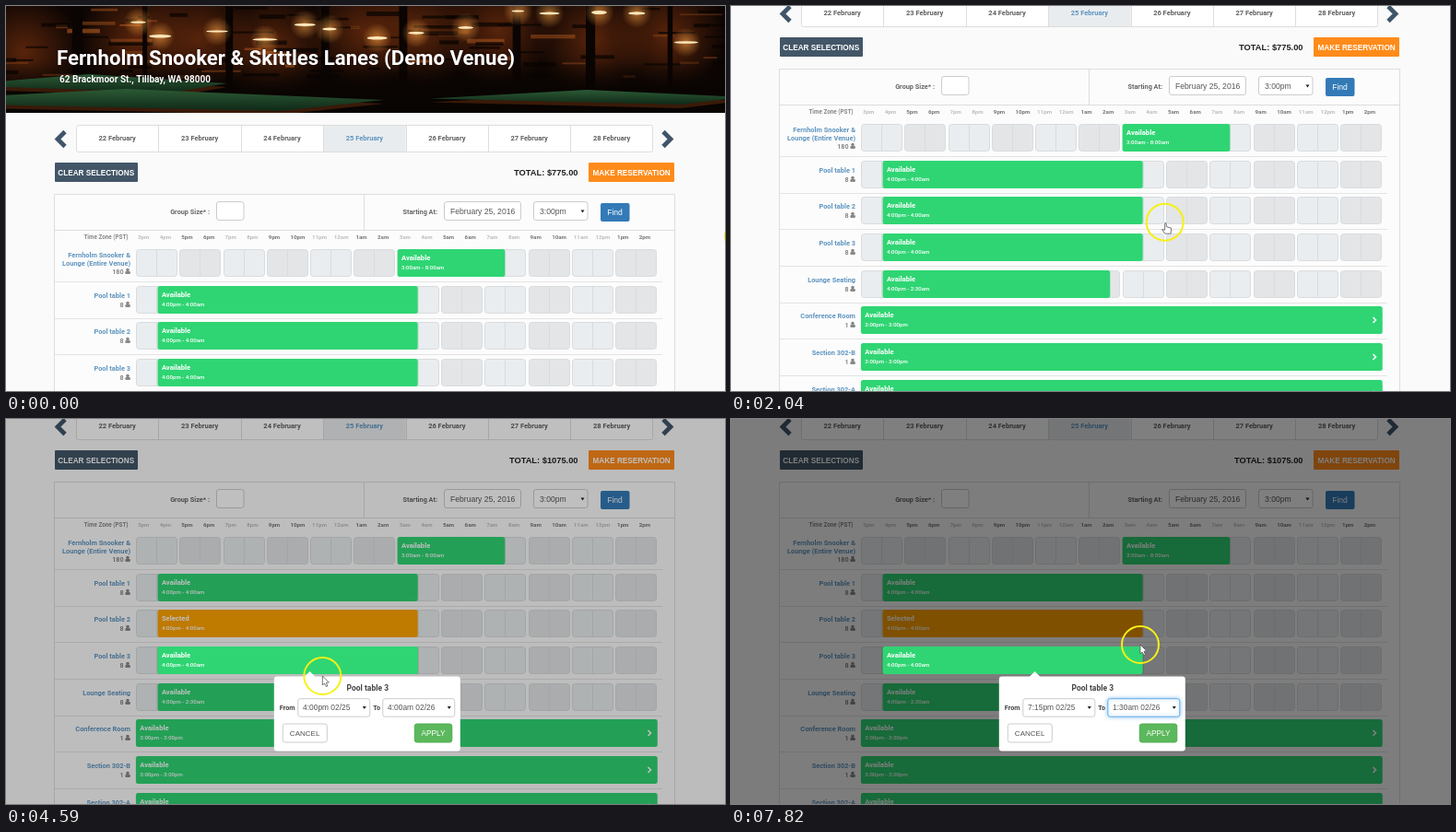
Write an HTML page with a canvas that moves like this. It is 780 px wide and 418 px high and loops after 7.99 s.

```html
<!DOCTYPE html>
<html lang="en">
<head>
<meta charset="utf-8">
<title>Venue reservation</title>
<style>
html, body { margin: 0; width: 100%; height: 100%; overflow: hidden; background: #fafafa; }
canvas { display: block; }
</style>
</head>
<body>
<canvas id="stage" width="780" height="418"></canvas>
<script>
const W = 780, H = 418, LOOP = 7990, STEP = 170, HERO_H = 116;
const ctx = document.getElementById('stage').getContext('2d');
const BOLD = ['700', 'Roboto, sans-serif'];
const MEDIUM = ['500', 'Roboto, sans-serif'];
const PLAIN = ['400', '"Liberation Sans", Arial, sans-serif'];
const HEAVY = ['700', '"Liberation Sans", Arial, sans-serif'];
const GREEN = '#2fd573', ORANGE = '#ffa200', LINK = '#5f95c0';
const GRID_X = 141, HOUR = 23.64, ROW_Y = 264, ROW_H = 39.67;
const LIST_Y = 92, LIST_H = 211, LIST_ROWS = 20, ITEM_H = 10.53;
const SCROLL = 136, SCROLL_TIME = 2040, FADE = 340, MOVE = 510;

// Block times are hours after 3pm
const rows = [
  { name: 'Fernholm Snooker &', extra: 'Lounge (Entire Venue)', seats: 180, from: 12, to: 17 },
  ...[1, 2, 3].map(n => ({ name: 'Pool table ' + n, seats: 8, from: 1, to: 13 })),
  { name: 'Lounge Seating', seats: 8, from: 1, to: 11.5 },
  ...['Conference Room', 'Section 302-B', 'Section 302-A'].map(name => ({ name, seats: 1, from: 0, to: 24 }))
];

// Pointer stops: arrival time and place
const stops = [
  [1700, 800, 250], [2210, 306, 227], [2890, 343, 309], [3230, 438, 302],
  [3910, 341, 276], [4250, 329, 262], [4930, 372, 313], [5270, 377, 345],
  [5610, 350, 234], [6120, 447, 313], [6630, 447, 366], [7310, 441, 240], [7820, 444, 245]
];

const ramp = (t, start, length) => Math.min(1, Math.max(0, (t - start) / length));
const mix = (a, b, k) => a + (b - a) * k;

function pointerAt(t) {
  const i = stops.findIndex(s => s[0] >= t);
  if (i < 0) return stops[stops.length - 1].slice(1);
  const [end, x, y] = stops[i];
  const [begin, px, py] = stops[Math.max(0, i - 1)];
  const move = Math.min(MOVE, end - begin) || 1;
  const k = i ? ramp(t, end - move, move) : 1;
  return [mix(px, x, k), mix(py, y, k)];
}

function text(s, x, y, size, color, face = BOLD, align = 'left') {
  ctx.font = `${face[0]} ${size}px ${face[1]}`;
  ctx.textAlign = align;
  ctx.fillStyle = color;
  ctx.fillText(s, x, y + size * .36);
}

function box(x, y, w, h, r, fill, line) {
  ctx.beginPath();
  ctx.roundRect(x, y, w, h, r);
  if (fill) { ctx.fillStyle = fill; ctx.fill(); }
  if (line) { ctx.strokeStyle = line; ctx.lineWidth = 1; ctx.stroke(); }
}

function rect(x, y, w, h, color, c = ctx) {
  c.fillStyle = color;
  c.fillRect(x, y, w, h);
}

function poly(points, color, c = ctx) {
  c.beginPath();
  points.forEach(([x, y]) => c.lineTo(x, y));
  c.closePath();
  c.fillStyle = color;
  c.fill();
}

function chevron(x, y, w, h, weight, color) {
  ctx.beginPath();
  ctx.moveTo(x - w / 2, y - h / 2);
  ctx.lineTo(x + w / 2, y);
  ctx.lineTo(x - w / 2, y + h / 2);
  ctx.strokeStyle = color;
  ctx.lineWidth = weight;
  ctx.stroke();
}

const triangle = (x, y, h, color) => poly([[x - 2, y - h / 2], [x + 2, y - h / 2], [x, y + h / 2]], color);

// A dim hall: warm glows, beams, lamps and pool tables
function makeHero() {
  const cv = document.createElement('canvas');
  cv.width = W;
  cv.height = HERO_H;
  const c = cv.getContext('2d');
  let seed = 29;
  const rnd = (a, b) => mix(a, b, (seed = seed * 16807 % 2147483647) / 2147483647);
  const glow = (x, y, r, rgb, a) => {
    const g = c.createRadialGradient(x, y, 0, x, y, r);
    g.addColorStop(0, `rgba(${rgb},${a})`);
    g.addColorStop(1, `rgba(${rgb},0)`);
    rect(x - r, y - r, 2 * r, 2 * r, g, c);
  };
  const table = (x, y, w, h) => {
    const top = [[x, y + h * .6], [x + w * .5, y], [x + w, y + h * .5], [x + w * .8, y + h]];
    poly(top.map(([px, py]) => [px, py + 4]), '#3a1a09', c);
    const cloth = c.createLinearGradient(0, y, 0, y + h);
    cloth.addColorStop(0, '#2c5a35');
    cloth.addColorStop(1, '#0f2817');
    poly(top, cloth, c);
  };

  rect(0, 0, W, HERO_H, '#0d0503', c);
  for (let x = 40; x < W; x += 85) glow(x + rnd(-20, 20), rnd(25, 55), 62, '150,62,18', .55);
  for (let i = 0; i < 90; i++) {
    const color = i % 3 ? 'rgba(8,3,1,.7)' : `rgba(205,105,38,${rnd(.2, .55)})`;
    rect(rnd(-20, W), rnd(0, 78), rnd(8, 50), rnd(1.5, 5), color, c);
  }
  for (let x = 60; x < W; x += 95) rect(x + rnd(-15, 15), 0, rnd(5, 11), 90, '#0a0402', c);
  for (let i = 0; i < 14; i++) {
    const x = 130 + i * 47 + rnd(-15, 15), y = rnd(4, 42);
    glow(x, y, 16, '255,165,70', .6);
    c.fillStyle = '#ffe9bd';
    c.beginPath();
    c.ellipse(x, y, rnd(6, 14), rnd(1, 2.2), 0, 0, 7);
    c.fill();
  }
  const shade = c.createLinearGradient(0, 60, 0, 95);
  shade.addColorStop(0, 'rgba(8,4,2,0)');
  shade.addColorStop(1, 'rgba(8,4,2,.9)');
  rect(0, 60, W, HERO_H - 60, shade, c);
  table(-60, 74, 300, 20);
  table(-150, 90, 560, 24);
  table(460, 91, 340, 16);
  return cv;
}
const hero = makeHero();

function drawHeader(total) {
  ctx.drawImage(hero, 0, 0);
  ctx.shadowColor = 'rgba(0,0,0,.6)';
  ctx.shadowBlur = 2;
  text('Fernholm Snooker & Skittles Lanes (Demo Venue)', 55, 56, 22.2, '#fff');
  text('62 Brackmoor St., Tillbay, WA 98000', 58, 79, 10, '#fff');
  ctx.shadowBlur = 0;

  box(76.5, 129.5, 625, 29, 2, '#fff', '#ddd');
  for (let i = 0; i < 7; i++) {
    const x = 76 + i * 89.4, on = i === 3;
    if (on) rect(x, 130, 89.4, 28, '#e9ecee');
    if (i) rect(Math.round(x), 130, 1, 28, '#ddd');
    text(`${22 + i} February`, x + 44.7, 143.2, 7.5, on ? LINK : '#606060', BOLD, 'center');
  }
  chevron(717, 144.5, 8, 16, 4.8, '#40556a');
  chevron(60, 144.5, -8, 16, 4.8, '#40556a');

  box(53, 170, 90, 21, 1, '#435668');
  text('CLEAR SELECTIONS', 97.7, 181, 8.2, '#fff', HEAVY, 'center');
  text('TOTAL: $' + total, 620.5, 181, 9.3, '#222', HEAVY, 'right');
  box(632, 170, 93, 21, 1, '#ff8b1a');
  text('MAKE RESERVATION', 678.6, 181, 8.2, '#fff', HEAVY, 'center');
}

function drawFilters() {
  box(52.5, 204.5, 673, 500, 0, '#fcfcfc', '#ddd');
  rect(53, 243, 672, 1, '#ddd');
  rect(388, 205, 1, 38, '#ddd');
  text('Group Size* :', 221, 223, 7.3, '#666', BOLD, 'right');
  text('Starting At:', 468, 223, 7.3, '#666', BOLD, 'right');
  const field = (x, w, value = '') => {
    box(x, 212.5, w, 20, 2.5, '#fff', '#ccc');
    text(value, x + 6.5, 223, 8.6, '#555', PLAIN);
  };
  field(228.5, 29.5);
  field(475.5, 83, 'February 25, 2016');
  field(572.5, 58.5, '3:00pm');
  triangle(625.5, 223, 3, '#222');
  box(645, 214, 31.5, 20, 2, '#337ab7');
  text('Find', 660.5, 224, 8.6, '#fff', PLAIN, 'center');

  text('Time Zone (PST)', 132.5, 250.5, 6.3, '#888', BOLD, 'right');
  for (let i = 0; i < 24; i++) {
    const label = clock(15 + i).replace(':00', '');
    text(label, GRID_X + i * HOUR + 2, 250.5, 6.2, i % 4 < 2 ? '#bdbdbd' : '#777');
  }
}

// h counts hours from midnight of the first day
function clock(h) {
  const m = Math.round(h * 60), hour = Math.floor(m / 60) % 24;
  return `${hour % 12 || 12}:${String(m % 60).padStart(2, '0')}${hour < 12 ? 'am' : 'pm'}`;
}
const stamp = h => `${clock(h)} 02/${h < 24 ? 25 : 26}`;

const rowTop = i => Math.round(ROW_Y + i * ROW_H);

function drawBlock(i, selected) {
  const { from, to } = rows[i], y = rowTop(i), x = GRID_X + from * HOUR - .1;
  box(x, y, (to - from) * HOUR - 1.5, 30, 2.5, selected ? ORANGE : GREEN);
  text(selected ? 'Selected' : 'Available', x + 4.4, y + 9.6, 7.6, '#fff');
  text(`${clock(15 + from)} - ${clock(15 + to)}`, x + 4.4, y + 19.4, 6.1, '#fff', MEDIUM);
  if (to === 24) chevron(698, y + 15, 3, 6, 1.6, '#fff');
}

function drawRow(i, selected) {
  const r = rows[i], y = rowTop(i), seatsY = y + (r.extra ? 24 : 20);
  text(r.name, 135, y + (r.extra ? 6.2 : 10.4), 7.4, LINK, BOLD, 'right');
  if (r.extra) text(r.extra, 135, y + 15, 7.4, LINK, BOLD, 'right');
  text(r.seats, 127.5, seatsY, 7.2, '#888', BOLD, 'right');
  ctx.beginPath();
  ctx.arc(132, seatsY - 1.5, 1.8, 0, 7);
  ctx.fill();
  box(129.3, seatsY, 5.6, 3, 1.2, '#888');
  for (let g = 0; g < 12; g++) {
    const x = Math.round(GRID_X + g * HOUR * 2);
    box(x + .5, y + .5, 44, 29, 3, g % 2 ? '#e4e5e7' : '#e9edef', '#d9dcde');
    rect(x + 22, y + 1, 1, 28, '#d9dcde');
  }
  drawBlock(i, selected);
  rect(53, y + 35, 659, 1, '#e4e4e4');
}

function drawSelect(x, y, value, focus) {
  if (focus) {
    ctx.shadowColor = 'rgba(102,175,233,.7)';
    ctx.shadowBlur = 4;
  }
  box(x + .5, y + .5, 78, 19.5, 2.5, '#fff', focus ? '#66afe9' : '#ccc');
  ctx.shadowBlur = 0;
  text(value, x + 5.8, y + 10.2, 8.4, '#555', PLAIN);
  triangle(x + 72.5, y + 10.2, 3, '#222');
}

// x is where the tip points
function drawPopover(tip, y, title, from, to, focus) {
  const x = tip - 38.8;
  box(x, y, 202, 81, 3, '#fff');
  poly([[tip - 6, y + .5], [tip, y - 5.5], [tip + 6, y + .5]], '#fff');
  text(title, x + 101.5, y + 12, 8.5, '#444', BOLD, 'center');
  text('From', x + 6, y + 34, 7.2, '#444');
  drawSelect(x + 25.5, y + 23.7, stamp(from), focus === 'from');
  text('To', x + 107.5, y + 34, 7.2, '#444');
  drawSelect(x + 117.5, y + 23.7, stamp(to), focus === 'to');
  box(x + 9.5, y + 51.5, 48, 20, 2.5, '#fff', '#ccc');
  text('CANCEL', x + 33.3, y + 61.5, 8, '#555', PLAIN, 'center');
  box(x + 152.5, y + 51.5, 40.5, 20, 2.5, '#5cb85c', '#4cae4c');
  text('APPLY', x + 172.7, y + 61.5, 8.3, '#fff', PLAIN, 'center');
}

// first, start and end are hours; the pointer picks the lit item
function drawList(x, first, start, end, value, pointerY) {
  box(x + .5, LIST_Y + .5, 77, LIST_H - 1, 0, '#fff', '#7da7d3');
  first = Math.round(first * 4) / 4;
  const over = Math.floor((pointerY - LIST_Y) / ITEM_H);
  const lit = over >= 0 && over < LIST_ROWS ? over : (value - first) * 4;
  for (let i = 0; i < LIST_ROWS; i++) {
    const y = LIST_Y + i * ITEM_H;
    if (i === lit) rect(x + 1, y + .7, 68, ITEM_H, '#1e90ff');
    text(stamp(first + i / 4), x + 5.3, y + 5.3, 8.4, i === lit ? '#fff' : '#555', PLAIN);
  }
  const bar = x + 69, span = LIST_H - 20, count = (end - start) * 4 + 1;
  rect(bar, LIST_Y + 1, 8, LIST_H - 2, '#f1f1f1');
  rect(bar + .5, LIST_Y + 10 + (first - start) * 4 / count * span, 7, LIST_ROWS / count * span, '#bcbcbc');
  triangle(bar + 4, LIST_Y + 5.5, -3, '#666');
  triangle(bar + 4, LIST_Y + LIST_H - 5.5, 3, '#444');
}

function drawPointer(x, y, hand) {
  ctx.beginPath();
  ctx.arc(x, y, 20, 0, 7);
  ctx.strokeStyle = '#f7f016';
  ctx.lineWidth = 2;
  ctx.stroke();
  ctx.save();
  ctx.translate(x, y);
  const shape = hand
    ? [[0, 1], [1.5, 1], [1.8, 5], [7, 6.5], [6.4, 12.5], [0, 12.5], [-3, 8], [0, 8.5]]
    : [[0, 0], [0, 10], [2, 8], [4, 11.5], [5.5, 11], [4, 7.2], [7, 7]];
  poly(shape, '#fff');
  ctx.strokeStyle = '#555';
  ctx.lineWidth = .8;
  ctx.stroke();
  ctx.restore();
}

function draw(t) {
  const scroll = SCROLL * (1 - (1 - ramp(t, 0, SCROLL_TIME)) ** 2.06);
  const dim = .5 * (ramp(t, 2380, FADE) - ramp(t, 3400, FADE) + ramp(t, 4420, FADE));
  const [px, py] = pointerAt(t);
  const applied = t >= 3570, first = t >= 2550 && !applied, second = t >= 4590;

  rect(0, 0, W, H, '#fafafa');
  ctx.save();
  ctx.translate(0, -Math.round(scroll));
  drawHeader(applied ? '1075.00' : '775.00');
  drawFilters();
  rows.forEach((r, i) => drawRow(i, applied && i === 2));
  rect(0, 0, W, 800, `rgba(0,0,0,${dim})`);
  if (first) drawBlock(2);
  if (second) drawBlock(3);
  ctx.restore();

  if (first) drawPopover(306, 240, rows[2].name, 16, 28);
  if (second) {
    const focus = t < 4930 ? '' : t < 6290 ? 'from' : 'to';
    drawPopover(329.6, 279.5, rows[3].name, t < 5780 ? 16 : 19.25, t < 7650 ? 28 : 25.5, focus);
  }
  if (t >= 5100 && t < 5780) drawList(316.5, 16, 16, 28, 16, py);
  if (t >= 6290 && t < 7650) drawList(408.5, mix(23.25, 22, ramp(t, 6630, 680)), 19.5, 28, 28, py);
  drawPointer(px, py, t < 2550 || (t >= 3230 && !second));
}

function tick(now) {
  draw(Math.floor(now % LOOP / STEP) * STEP);
  requestAnimationFrame(tick);
}
requestAnimationFrame(tick);
</script>
</body>
</html>
```
